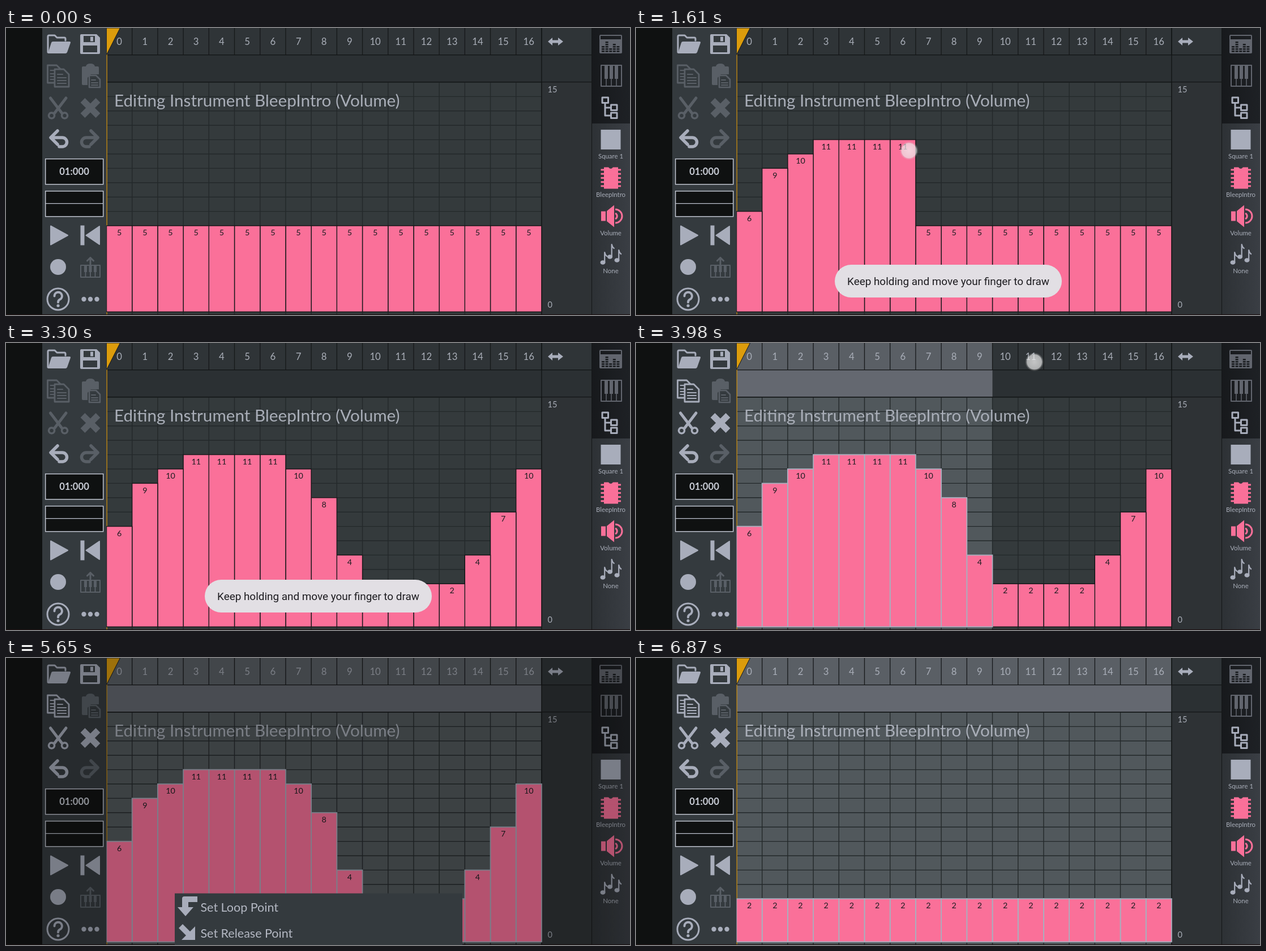
An HTML page that plays this animation: 1102 by 508 pixels, repeating every 6940 ms.

```html
<!DOCTYPE html>
<html lang="en">
<head>
<meta charset="utf-8">
<title>Volume envelope editor</title>
<style>
  html, body { margin: 0; width: 100%; height: 100%; overflow: hidden; background: #0f1111; }
  svg { display: block; width: 100vw; height: 100vh; font-family: Lato, "Open Sans", sans-serif; }
  .icon { fill: #a8adbb; stroke: none; }
  .line { fill: none; stroke: #a8adbb; stroke-width: 3; stroke-linejoin: round; stroke-linecap: round; }
  .off { opacity: .32; }
  .half { opacity: .5; }
  .pink { fill: #fa7099; }
  .pinkline { fill: none; stroke: #fa7099; stroke-width: 3; }
  .mid { text-anchor: middle; }
  .small { font-size: 11.4px; fill: #a9aeb9; text-anchor: middle; }
</style>
</head>
<body>
<svg id="stage" viewBox="0 0 1102 508"></svg>
<script>
const LOOP = 6940, COUNT = 17, LEFT = 177.5, COL = 45.2, TOP = 96, ROW = 25.4;
const RIGHT = LEFT + COUNT * COL, BOTTOM = TOP + 16 * ROW;
const DRAWN = [6, 9, 10, 11, 11, 11, 11, 10, 8, 4, 2, 2, 2, 2, 4, 7, 10];
const FLAT_BEFORE = 5, FLAT_AFTER = 2;

// Finger strokes as [time, x, y]
const DRAW_PATH = [[390, 200, 340], [1100, 200, 337], [1270, 245, 262], [1400, 295, 230],
  [1610, 482, 217], [1830, 522, 236], [2020, 562, 288], [2220, 607, 386], [2420, 655, 440],
  [2740, 788, 440], [2880, 833, 388], [2990, 878, 312], [3110, 923, 236], [3180, 925, 236]];
const SELECT_PATH = [[3580, 190, 34], [3640, 200, 34], [3980, 702.5, 33.5], [4160, 890, 33], [4300, 925, 32], [4520, 925, 32]];
const MENU_TAP = [[5390, 149, 480], [5530, 149, 480]];
const FLATTEN_TAP = [[6655, 470, 487], [6740, 470, 487]];
const STROKES = [DRAW_PATH, SELECT_PATH, MENU_TAP, FLATTEN_TAP];
const FLATTEN_TIME = 6700, SELECT_LAG = 60;

const clamp = v => Math.max(0, Math.min(1, v));
const ramp = (t, from, to) => clamp((t - from) / (to - from));
const easeOut = v => 1 - (1 - v) ** 3;
const range = n => [...Array(n).keys()];
const each = (n, fn) => range(n).map(fn).join('');
const levelY = v => TOP + (15 - v) * ROW;
const columnAt = x => Math.max(0, Math.min(COUNT - 1, Math.floor((x - LEFT) / COL)));

const rect = (x, y, w, h, fill, extra = '') =>
  `<rect x="${x}" y="${y}" width="${w}" height="${h}" fill="${fill}" ${extra}/>`;
const box = (x, y, w, h, cls = 'icon') => `<rect class="${cls}" x="${x}" y="${y}" width="${w}" height="${h}"/>`;
const path = (d, cls = 'icon', extra = '') => `<path class="${cls}" d="${d}" ${extra}/>`;
const line = (d, width) => path(d, 'line', `style="stroke-width:${width}"`);
const circle = (x, y, r, cls = 'icon') => `<circle class="${cls}" cx="${x}" cy="${y}" r="${r}"/>`;
const text = (x, y, size, label, extra = '') => `<text x="${x}" y="${y}" font-size="${size}" ${extra}>${label}</text>`;
const stroke = (d, color, width = 1.3) => `<path d="${d}" fill="none" stroke="${color}" stroke-width="${width}"/>`;
const group = (content, attrs = '') => `<g ${attrs}>${content}</g>`;

const defs = `<defs>
  <radialGradient id="touch">
    <stop offset="0" stop-color="#f2f2f2" stop-opacity=".76"/>
    <stop offset=".78" stop-color="#ececec" stop-opacity=".68"/>
    <stop offset=".86" stop-color="#ddd" stop-opacity=".3"/>
    <stop offset="1" stop-color="#ddd" stop-opacity="0"/>
  </radialGradient>
  <linearGradient id="tabs"><stop offset="0" stop-color="#2d3135"/><stop offset="1" stop-color="#3a3e44"/></linearGradient>
  <linearGradient id="tabsTop"><stop offset="0" stop-color="#17191c"/><stop offset="1" stop-color="#1e2125"/></linearGradient>
</defs>`;

function sidebar() {
  const page = (x, y) => path(`M${x} ${y}h16l9 9v22h-25z`, 'line', 'style="stroke-width:2.8;fill:#343a3e"') +
    line(`M${x + 5} ${y + 9}h9m-9 6h15m-15 5h15m-15 5h15`, 2.2);
  const undo = line('M91 182L79 194L91 206M80 194H99.500A8 8 0 0 1 99.500 210H94', 5.5);
  const keys = line('M132 420h34v21h-34zM140.500 420v21M149 420v21M157.500 420v21', 2) +
    each(3, i => box(138 + i * 8.5, 420, 5, 12));
  const copy = page(73.5, 66) + page(86, 73);
  const cut = line('M78.500 124L99 151M106 124L85.500 151', 5) +
    line('M80.500 150a5 5 0 1 0 .1 0zM103.500 150a5 5 0 1 0 .1 0z', 3.4);
  const remove = path('M135.500 128L162.500 155M162.500 128L135.500 155', 'line', 'style="stroke-width:11;stroke-linecap:butt"');
  const paste = path('M136 68h5q1-5 8-5t8 5h5q2 0 2 2v12h-14l-6 6v13h-8q-2 0-2-2v-29q0-2 2-2z') +
    line('M147 84h12l7 7v14h-19z', 2.5) +
    line('M151 92h7m-7 5h11m-11 4h11M141 72h16', 2);
  return rect(0, 0, 64, 508, '#0f1111') + rect(64, 0, 113.5, 508, '#343a3e') +
    path('M74 43V15q0-2 2-2h10l4 4h13q2 0 2 2v3', 'line') +
    path('M83 24H112q2.500 0 2 2L108 43q-1 2-3 2H74L80 26q.5-2 3-2z') +
    path('M133 11h27l6 6v27q0 2-2 2h-31q-2 0-2-2V13q0-2 2-2zM137 14v11h20v-11zM136 31v12h25v-12zM149 15.500h5v8h-5z', 'icon', 'fill-rule="evenodd"') +
    group(copy + cut + remove, 'id="edit"') + group(paste, 'class="off"') +
    undo + group(undo, 'class="off" transform="translate(241 0) scale(-1 1)"') +
    rect(69.7, 231.7, 102, 45, '#0f1111', 'stroke="#bfc4cf" stroke-width="1.5"') +
    text(120.5, 260, 16.7, '01:000', 'class="mid" font-weight="700" fill="#c9cdd6"') +
    rect(69.7, 288.7, 102, 45, '#0f1111', 'stroke="#bfc4cf" stroke-width="1.5"') +
    stroke('M70 310.700H171', '#bfc4cf') +
    path('M79 350.500L109 367L79 383.500z', 'icon', 'style="stroke:#a8adbb;stroke-width:2;stroke-linejoin:round"') +
    box(131.5, 349.5, 7, 35) + path('M165 351v32L141.500 367z', 'icon', 'style="stroke:#a8adbb;stroke-width:2;stroke-linejoin:round"') +
    circle(92, 423, 14) +
    group(keys + path('M149 418V407M143.500 412L149 406.500L154.500 412', 'line'), 'class="off"') +
    circle(92, 480, 19, 'line') + line('M85.500 474.500a6.700 6.700 0 1 1 9.500 6q-3 1.500-3 5', 4) + circle(92, 491.5, 2.6) +
    each(3, i => circle(137.5 + i * 11.5, 480, 4.2));
}

function tabs() {
  const mixer = path('M1050 12h36q2 0 2 2v29q0 2-2 2h-36q-2 0-2-2v-29q0-2 2-2zM1050 14v6h36v-6z', 'icon', 'fill-rule="evenodd"') +
    each(5, i => each([3, 5, 2, 4, 3][i], j => rect(1052 + i * 6.6, 40 - j * 4, 5, 2.6, '#191c1f')));
  const piano = line('M1051 66h36v37h-36z', 2) + line('M1060 66v37M1069 66v37M1078 66v37', 1.5) +
    each(3, i => box(1057 + i * 9, 66, 6, 24));
  const tree = line('M1053 123h10.500v9.500h-10.500zM1068.500 136h10.500v9.500h-10.500zM1068.500 150h10.500v9.500h-10.500zM1058 133v22h10.500M1058 141h10.500', 3);
  const chip = path('M1056 246.500h8q4 5 8 0h9v38h-25z', 'pink') +
    each(5, i => box(1050.5, 249.5 + i * 7.2, 35.5, 3, 'pink'));
  const speaker = path('M1051 324.500h8v17h-8zM1061 324L1074 313.500V352.500L1061 342z', 'pink') +
    path('M1076 328a5.500 5.500 0 0 1 0 10M1076 321a12 12 0 0 1 0 24', 'pinkline');
  const notes = [[1054, 415], [1066.5, 405], [1079, 411]].map(([x, y], i) =>
    `<ellipse class="icon" cx="${x}" cy="${y}" rx="4.500" ry="3.800"/>` +
    line(`M${x + 3.2} ${y}v-${i == 1 ? 22 : 18}q1 5 4 7`, 2.2)).join('');
  return rect(1034, 0, 68, 508, 'url(#tabs)') + rect(1034, 0, 68, 169, 'url(#tabsTop)') +
    stroke('M1034.500 0V508', '#141617', 1) +
    group(mixer + piano, 'class="half"') + tree + box(1050.5, 180, 35, 35) + chip + speaker + notes +
    ['Square 1', 'BleepIntro', 'Volume', 'None'].map((label, i) =>
      `<text class="small" x="1068" y="${231 + i * 67.8}">${label}</text>`).join('');
}

function grid() {
  const rows = each(17, i => `M${LEFT} ${TOP + i * ROW}H${RIGHT}`);
  const columns = each(COUNT + 1, i => `M${LEFT + i * COL} ${TOP}V508`);
  const ticks = each(COUNT + 1, i => `M${LEFT + i * COL} 0V48`);
  const tint = (y, h, opacity) => `<rect class="tint" x="${LEFT}" y="${y}" height="${h}" width="0" fill="#a9aebb" opacity="${opacity}"/>`;
  return rect(LEFT, 0, 857, 48, '#2f3437') + rect(LEFT, 48, 857, 48, '#2b3033') +
    rect(LEFT, 96, 769, 412, '#343a3c') + rect(RIGHT, 96, 88.5, 412, '#2e3235') +
    tint(0, 48, .35) + tint(48, 48, .45) + tint(96, 412, .25) +
    stroke(rows + columns, '#23282a', 1.4) + stroke(ticks, '#16191a') +
    stroke(`M${LEFT} 47.700H1034M${LEFT} 95.700H1034M${RIGHT} 0V508`, '#121415') +
    path('M957 24l8-7v4.500h10V17l9 7l-9 7v-4.500H965V31z') +
    each(COUNT, i => text(LEFT + (i + .5) * COL, 30, 16.7, i, 'class="mid" fill="#a9aeb8"')) +
    text(956.5, 114, 14.5, '15', 'fill="#a9aeb8"') + text(956.5, 495, 14.5, '0', 'fill="#a9aeb8"') +
    rect(LEFT - .5, 0, 1.8, 508, '#c88c10') +
    `<path d="M177.500 0H201.500L177.500 47.500z" fill="#dc9c0c" stroke="#16191a"/>` +
    text(191, 138.6, 29.65, 'Editing Instrument BleepIntro (Volume)', 'fill="#a9aeb8"');
}

function menu() {
  const items = ['Set Loop Point', 'Set Release Point', 'Clear Selection', 'Flatten Selection'];
  return rect(298, 323.5, 508, 200, '#343a3e') +
    path('M338 329V339H322V348H331L317 364L303 348H311V333q0-4 4-4z') +
    path('M305 385L312 378L325 391L334 382V406H310L318 398z') +
    path('M306 424h30v30h-30z', 'line', 'style="stroke-width:2.500;stroke-dasharray:4 3;stroke-linecap:butt"') +
    line('M303 422L338 457', 2.5) +
    line('M307 482.500h5v5h-5zM329 482.500h5v5h-5zM315 485h11', 2) +
    items.map((label, i) => text(343.5, 356 + i * 46, 21.5, label, 'fill="#b4b8c3"')).join('');
}

const stage = document.getElementById('stage');
stage.innerHTML = defs + grid() +
  // Later columns first, so each selected outline stays on top of its right neighbour
  each(COUNT, i => `<rect class="bar" x="${LEFT + (COUNT - 1 - i) * COL}" width="${COL}" fill="#fa7099"/>`) +
  each(COUNT, i => text(LEFT + (i + .5) * COL, 0, 14.3, '', 'class="level mid" fill="#1b1c1f"')) +
  sidebar() + tabs() +
  rect(0, 506.8, 1102, 1.2, '#1d1213') +
  rect(0, 0, 1102, 508, '#090a0a', 'id="dim"') + group(menu(), 'id="menu"') +
  group(rect(351, 419, 401, 58, '#e2dfe4', 'rx="29"') +
    text(551.5, 454.5, 18.9, 'Keep holding and move your finger to draw', 'class="mid" fill="#1d1c20" font-family="Roboto, sans-serif"'), 'id="toast"') +
  '<circle id="finger" r="16.500" fill="url(#touch)"/>';

const get = id => document.getElementById(id);
const bars = [...stage.querySelectorAll('.bar')].reverse(), levels = [...stage.querySelectorAll('.level')];
const tints = [...stage.querySelectorAll('.tint')];
const dim = get('dim'), menuGroup = get('menu'), toast = get('toast'), finger = get('finger'), edit = get('edit');

function along(points, t) {
  let i = 0;
  while (i < points.length - 2 && t > points[i + 1][0]) i++;
  const [a, b] = [points[i], points[i + 1]], k = ramp(t, a[0], b[0]);
  return [a[1] + (b[1] - a[1]) * k, a[2] + (b[2] - a[2]) * k];
}

function valueAt(i, t) {
  if (t >= FLATTEN_TIME) return FLAT_AFTER;
  const reached = t >= 800 ? columnAt(along(DRAW_PATH, t)[0]) : -1;
  return i <= reached ? DRAWN[i] : FLAT_BEFORE;
}

function render(t) {
  const selected = t >= SELECT_PATH[0][0] + SELECT_LAG ? columnAt(along(SELECT_PATH, t - SELECT_LAG)[0]) + 1 : 0;
  tints.forEach(tint => tint.setAttribute('width', selected * COL));
  edit.setAttribute('class', selected ? '' : 'off');

  bars.forEach((bar, i) => {
    const value = valueAt(i, t), y = levelY(value);
    bar.setAttribute('y', y);
    bar.setAttribute('height', BOTTOM - y);
    bar.setAttribute('stroke', i < selected ? '#a9afbe' : '#17181a');
    bar.setAttribute('stroke-width', i < selected ? 1.8 : 1.4);
    levels[i].setAttribute('y', y + 17.2);
    levels[i].textContent = value;
  });

  const open = easeOut(ramp(t, 5560, 5990)) * (1 - ramp(t, FLATTEN_TIME, 6865));
  dim.setAttribute('opacity', .57 * open);
  menuGroup.setAttribute('transform', `translate(0 ${190 * (1 - open)})`);
  toast.setAttribute('opacity', ramp(t, 820, 1020) * (1 - ramp(t, 3400, 3600)));

  const touch = STROKES.find(s => t >= s[0][0] && t < s[s.length - 1][0]);
  finger.setAttribute('visibility', touch ? 'visible' : 'hidden');
  if (touch) {
    const [x, y] = along(touch, t);
    finger.setAttribute('cx', x);
    finger.setAttribute('cy', y);
  }
}

const start = performance.now();
function tick() {
  render((performance.now() - start) % LOOP);
  requestAnimationFrame(tick);
}
tick();
</script>
</body>
</html>
```
